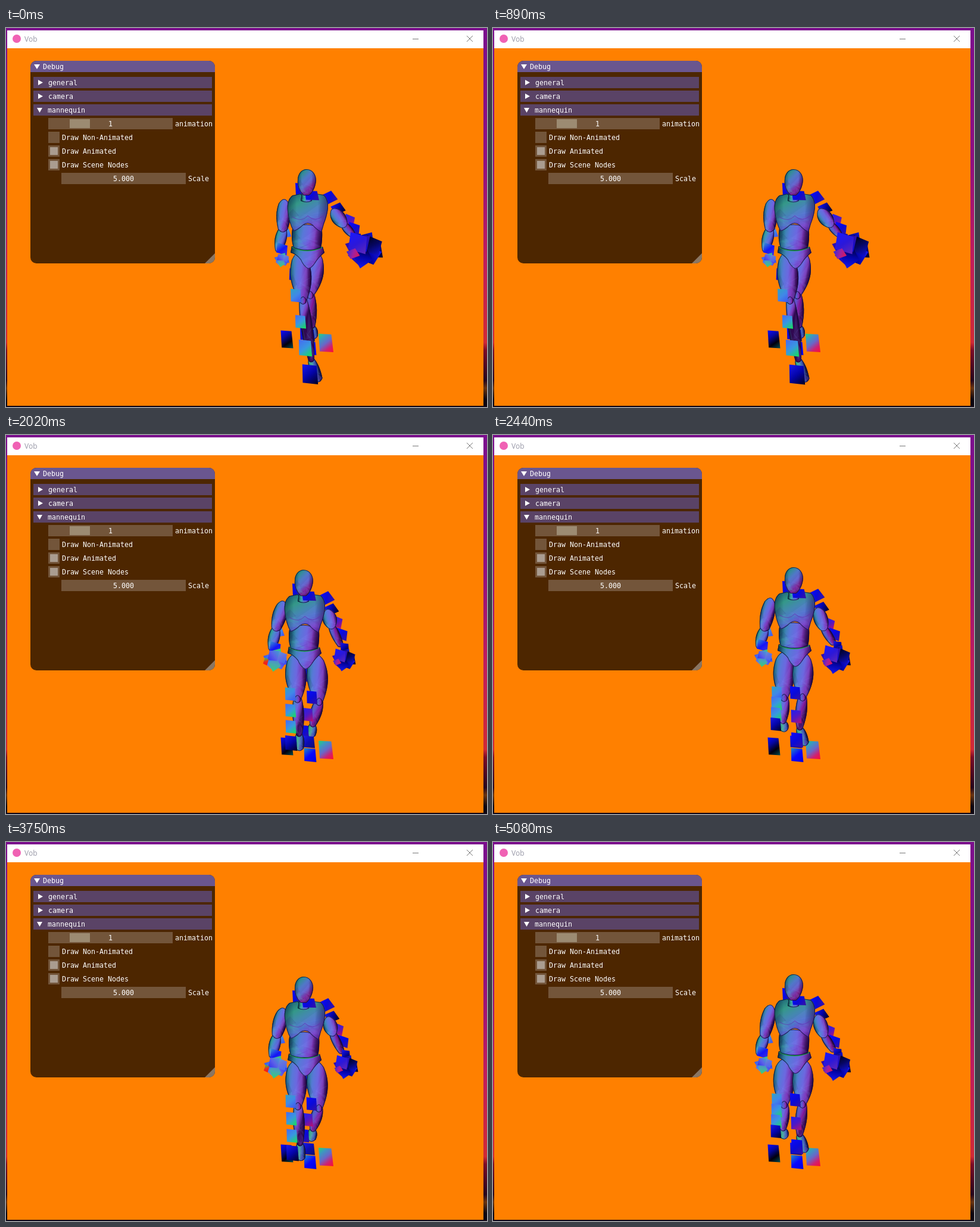
An HTML page with a canvas that plays this animation: 808 px wide and 636 px high, repeating every 5.18 s.

```html
<!DOCTYPE html>
<html lang="en">
<head>
<meta charset="utf-8">
<title>Vob</title>
<style>
html, body { margin: 0; width: 100%; height: 100%; overflow: hidden; background: #ff8000; }
svg, canvas { position: absolute; left: 0; top: 0; display: block; }
.ui { font: 11.63px "DejaVu Sans Mono", monospace; fill: #fff; white-space: pre; }
</style>
</head>
<body>
<svg width="808" height="636" viewBox="0 0 808 636">
  <defs>
    <linearGradient id="desk" x2="0" y2="1">
      <stop offset="0" stop-color="#7b0d8d"/><stop offset=".35" stop-color="#8f0f80"/>
      <stop offset=".6" stop-color="#c01c5c"/><stop offset=".83" stop-color="#d02a36"/>
      <stop offset=".85" stop-color="#7c0c26"/><stop offset=".93" stop-color="#26061c"/>
      <stop offset=".95" stop-color="#6a3410"/><stop offset=".98" stop-color="#0c0610"/>
    </linearGradient>
    <clipPath id="panel"><rect x="41" y="55" width="310" height="340" rx="10"/></clipPath>
  </defs>
  <g shape-rendering="crispEdges">
    <rect width="808" height="636" fill="url(#desk)"/>
    <rect y="634" width="808" height="2" fill="#120816"/>
    <rect x="2" y="4" width="800" height="30" fill="#fff"/>
    <rect x="2" y="34" width="800" height="600" fill="#ff8000"/>
    <path d="M683 18.5h10" stroke="#777"/>
  </g>
  <circle cx="18" cy="18" r="7" fill="#f062b4"/>
  <text x="31" y="23" font-size="12" fill="#9797a6" font-family="Open Sans, sans-serif">Vob</text>
  <path d="M774 13l10 10m0-10l-10 10" stroke="#777"/>

  <g clip-path="url(#panel)">
    <rect x="41" y="55" width="310" height="340" fill="#4d2600"/>
    <rect x="41" y="55" width="310" height="19" fill="#6a568f"/>
    <path d="M351 378v17h-17z" fill="#8a7663"/>
  </g>
  <path fill="#5a4366" d="M46 82h300v19h-300zM46 105h300v19h-300zM46 128h300v19h-300z"/>
  <path fill="#73553a" d="M71 151h209v19h-209zM71 174h19v19h-19zM71 197h19v19h-19zM71 220h19v19h-19zM93 243h209v19h-209z"/>
  <path fill="#9c8b72" d="M107 153h34v15h-34z"/>
  <path fill="#aa9c90" d="M74 200h13v13h-13zM74 223h13v13h-13z"/>
  <path fill="#fff" d="M47 61h10l-5 8zM54 87l8 4.5l-8 4.5zM54 110l8 4.5l-8 4.5zM52 134h9l-4.500 8z"/>
  <g class="ui">
    <text x="62" y="69">Debug</text>
    <text x="71" y="96">general</text>
    <text x="71" y="119">camera</text>
    <text x="70" y="142">mannequin</text>
    <text x="172" y="165">1</text>
    <text x="284" y="165">animation</text>
    <text x="94" y="188">Draw Non-Animated</text>
    <text x="94" y="211">Draw Animated</text>
    <text x="94" y="234">Draw Scene Nodes</text>
    <text x="180" y="257">5.000</text>
    <text x="306" y="257">Scale</text>
  </g>
</svg>
<canvas width="808" height="636"></canvas>
<script>
const g = document.querySelector('canvas').getContext('2d');
const LOOP = 5180, LAST = 5080, STRIDE = 879;

// Four poses of one stride: contact, passing, opposite contact, passing.
const KEYS = [0, .285, .5, .775];
// x at each key, then y at each key. L and R are sides of the picture.
const JOINTS = {
  head:  [505, 500, 503, 505, 237, 226, 238, 222],
  shL:   [467, 464, 463, 465, 295, 286, 295, 281],
  elL:   [465, 454, 449, 456, 338, 325, 330, 325],
  wrL:   [457, 446, 441, 446, 374, 360, 366, 356],
  handL: [464, 454, 453, 455, 389, 377, 387, 374],
  shR:   [553, 542, 540, 547, 311, 301, 302, 298],
  elR:   [568, 548, 543, 556, 331, 322, 326, 325],
  wrR:   [583, 563, 553, 572, 348, 353, 350, 350],
  handR: [603, 570, 556, 577, 372, 377, 369, 376],
  hipL:  [493, 485, 488, 488, 388, 379, 390, 376],
  knL:   [499, 490, 488, 489, 456, 442, 450, 440],
  anL:   [513, 493, 491, 487, 558, 505, 500, 482],
  toeL:  [525, 494, 490, 489, 590, 528, 514, 494],
  hipR:  [519, 521, 519, 521, 386, 379, 390, 376],
  knR:   [511, 526, 518, 520, 447, 446, 459, 439],
  anR:   [514, 515, 512, 515, 502, 485, 560, 493],
  toeR:  [517, 513, 508, 524, 518, 501, 594, 518]
};
const GRIP = { L: [13, 21, 21, 16], R: [33, 21, 19, 26] };

const SKIN = ['#0c3444', '#3488a8', '#5878d8', '#6c68e0', '#7c38b8', '#300850'];
const COOL = ['#0c5848', '#30a498', '#4c88d0', '#5c64d8', '#402898'];
const WARM = ['#203070', '#5068c8', '#6450cc', '#84189c', '#3c0850'];
const FOOT = ['#0c4c34', '#34b080', '#50a0a8', '#3c58b4', '#141c50'];
const BLUE = ['#0a0aff', '#0a0ad8', '#3810a0'];
const NAVY = ['#1818f0', '#0404a8', '#00001c'];
const PINK = ['#1c20f4', '#5018c4', '#c01068'];
const TEAL = ['#30a4c0', '#4088e8', '#4050f0'];
const LIME = ['#4868f4', '#3898e0', '#14e450'];

const HEAD = new Path2D('M0 0C11 0 16 10 16 19C15 30 10 40 4 44H-5C-12 38-16 28-15 18C-15 8-9 0 0 0Z');
const NECK = new Path2D('M-8 40H8L9 53Q0 58-10 53Z');
const CHEST = new Path2D('M-24 44L-10 41Q2 56 16 41L29 43Q37 50 36 66Q34 80 29 92L25 106Q14 100 10 94Q2 88-6 94Q-14 102-22 104Q-30 90-32 70Q-34 52-24 44Z');
const BELLY = new Path2D('M-24 100Q2 84 26 102Q27 118 24 132Q2 140-22 132Q-27 116-24 100Z');
const PELVIS = new Path2D('M-25 129Q2 140 27 130L30 140Q20 148 14 158Q8 167 2 167Q-6 162-10 152Q-18 142-27 140Z');

// Smooth periodic curve through the key values.
function track(v, p) {
  const at = i => KEYS[i & 3] + Math.floor(i / 4), val = i => v[i & 3];
  const slope = i => (val(i + 1) - val(i - 1)) / (at(i + 1) - at(i - 1));
  let i = 3;
  while (KEYS[i] > p) i--;
  const d = at(i + 1) - at(i), u = (p - at(i)) / d, w = 1 - u;
  return w * w * ((1 + 2 * u) * val(i) + u * d * slope(i)) +
         u * u * ((3 - 2 * u) * val(i + 1) - w * d * slope(i + 1));
}

function blend(x0, y0, x1, y1, cols) {
  const b = g.createLinearGradient(x0, y0, x1, y1);
  cols.forEach((c, i) => b.addColorStop(i / (cols.length - 1), c));
  return b;
}

function random(seed) {
  return () => (seed = (seed * 16807) % 2147483647) / 2147483647;
}

// Fills a shape, then adds flat facets, dark sides and an outline.
function part(path, fill, x, y, w, h) {
  g.save();
  g.fillStyle = fill;
  g.fill(path);
  g.clip(path);
  const rnd = random(7919);
  const tints = ['#50c8b0', '#201060', '#8038c8', '#8090f0'];
  g.globalAlpha = .12;
  for (let i = 0; i < 16; i++) {
    const cx = x + w * rnd(), cy = y + h * rnd();
    g.fillStyle = tints[i & 3];
    g.beginPath();
    for (let k = 0; k < 3; k++) g.lineTo(cx + (rnd() - .5) * w * .8, cy + (rnd() - .5) * h * .5);
    g.fill();
  }
  g.globalAlpha = .5;
  g.fillStyle = blend(x, 0, x + w, 0, ['#001830', '#00183000', '#18003000', '#18003000', '#180030']);
  g.fillRect(x, y, w, h);
  g.globalAlpha = .8;
  g.lineWidth = 2;
  g.strokeStyle = '#0a1038';
  g.stroke(path);
  g.restore();
}

// Tapered limb from a to b; half widths at the start, middle and end.
function limb(a, b, wa, wm, wb, cols) {
  const dx = b.x - a.x, dy = b.y - a.y, n = Math.hypot(dx, dy), w = Math.max(wa, wm, wb);
  const path = new Path2D();
  path.moveTo(-wa, 0);
  path.bezierCurveTo(-wm, n * .3, -wm, n * .6, -wb, n);
  path.quadraticCurveTo(0, n + wb * 1.2, wb, n);
  path.bezierCurveTo(wm, n * .6, wm, n * .3, wa, 0);
  path.quadraticCurveTo(0, -wa * 1.8, -wa, 0);
  g.save();
  g.translate(a.x, a.y);
  g.rotate(Math.atan2(dy, dx) - Math.PI / 2);
  part(path, blend(-w, 0, w, n * .1, cols), -w, -wa, 2 * w, n + 2 * wa);
  g.restore();
}

function cube(x, y, w, h, turn, cols) {
  g.save();
  g.translate(x, y);
  g.rotate(turn);
  g.fillStyle = blend(-w / 2, -h / 2, w / 2, h / 2, cols);
  g.beginPath();
  g.moveTo(-w * .5, -h * .5);
  g.lineTo(w * .36, -h * .46);
  g.lineTo(w * .5, h * .5);
  g.lineTo(-w * .42, h * .46);
  g.fill();
  g.restore();
}

function fist(c, r, sets) {
  for (let i = 0; i < 8; i++) {
    const a = i * 2.4;
    cube(c.x + Math.cos(a) * r * .46, c.y + Math.sin(a) * r * .38, r * .9, r * .8, i * .7, sets[i % sets.length]);
  }
}

function arms(j, p) {
  const { head: o, shL, elL, wrL, handL, shR, elR, wrR, handR } = j;
  cube(elL.x + 6, elL.y + 6, 14, 15, -.2, TEAL);
  limb(elL, wrL, 7, 11, 5, COOL);
  limb(shL, elL, 9, 13, 8, SKIN);
  cube(wrL.x + 7, wrL.y - 3, 20, 17, .25, ['#3890d0', '#1414f8', '#4030e0']);
  const rl = track(GRIP.L, p);
  fist(handL, rl, [TEAL, ['#4068f0', '#6470e0', '#5ca0d0'], ['#38d070', '#48a8b0', '#5078e0'], ['#3030f0', '#5c60e8', '#40a0d0']]);
  if (rl > 17) cube(handL.x - rl * .8, handL.y + 3, 8, 11, .4, ['#20d850', '#e83020', '#ff1010']);

  cube(o.x + 39, o.y + 47, 20, 19, -.5, BLUE);
  cube(shR.x + 5, shR.y - 8, 20, 17, -.45, NAVY);
  cube(elR.x + 9, elR.y - 8, 19, 17, .35, PINK);
  cube((elR.x + wrR.x) / 2 + 9, (elR.y + wrR.y) / 2 - 3, 22, 17, .3, BLUE);
  limb(elR, wrR, 6, 8, 5, WARM);
  limb(shR, elR, 10, 13, 7, SKIN);
  cube(wrR.x + 7, wrR.y + 3, 15, 13, .1, NAVY);
  const rr = track(GRIP.R, p);
  fist(handR, rr, [NAVY, BLUE, ['#1010d0', '#060660', '#000010']]);
  cube(handR.x - rr * .35, handR.y - rr * .33, rr, rr * .9, .25, ['#1818ff', '#2c18d8', '#6028b8']);
  cube(handR.x - rr * .6, handR.y + rr * .2, rr * .55, rr * .45, -.4, ['#3028d8', '#a020a0', '#e01850']);
}

function leg(hip, knee, ankle, toe, cols, nodes) {
  limb(ankle, toe, 6, 9, 7, FOOT);
  limb(knee, ankle, 7, 11, 5, cols);
  limb(hip, knee, 13, 20, 7, SKIN);
  limb({ x: knee.x, y: knee.y - 1 }, { x: knee.x, y: knee.y + 5 }, 5, 6, 5, WARM);
  nodes();
}

// Evenly spaced nodes from the knee to the foot, larger nearer the camera.
function chain(a, b, sets) {
  sets.forEach((cols, i) => {
    const u = i / (sets.length - 1), y = a.y + (b.y - a.y) * u;
    const s = 19 + Math.max(0, y - 490) * .1;
    cube(a.x + (b.x - a.x) * u, y, s, s * 1.15, .05, cols);
  });
}

function legs(j) {
  const { hipL, knL, anL, toeL, hipR, knR, anR, toeR } = j;
  const left = () => leg(hipL, knL, anL, toeL, SKIN, () =>
    chain({ x: knL.x - 12, y: knL.y - 7 }, { x: toeL.x - 14, y: toeL.y - 9 }, [TEAL, LIME, LIME, NAVY]));
  const right = () => leg(hipR, knR, anR, toeR, WARM, () =>
    chain({ x: knR.x - 12, y: knR.y - 6 }, { x: toeR.x - 13, y: toeR.y - 6 }, [BLUE, PINK, BLUE]));
  const order = toeL.y > toeR.y ? [right, left] : [left, right];
  order[0]();
  cube(509, 515, 21, 20, .05, ['#1818f0', '#0c0cb0', '#101068']);
  cube(511, 537, 22, 23, .05, ['#2090c0', '#0808ff', '#0000e0']);
  order[1]();
}

function torso(o) {
  g.save();
  g.translate(o.x, o.y);
  part(PELVIS, blend(-27, 130, 30, 150, SKIN), -27, 129, 57, 38);
  g.strokeStyle = '#149c3c';
  g.lineWidth = 2;
  g.stroke(new Path2D('M-24 131Q2 142 26 131'));
  part(BELLY, blend(-26, 100, 26, 110, SKIN), -26, 90, 52, 45);
  part(CHEST, blend(-20, 42, 18, 112, ['#206878', '#349888', '#4488b0', '#5070cc', '#7848c8', '#581c98']), -34, 42, 70, 62);
  g.lineWidth = 1;
  g.strokeStyle = '#6428b0b0';
  g.stroke(new Path2D('M-24 80Q-8 90 2 78Q14 90 28 78'));
  part(NECK, blend(-10, 0, 10, 0, COOL), -10, 40, 20, 16);
  cube(9, 44, 24, 16, 0, BLUE);
  part(HEAD, blend(-15, 4, 16, 34, ['#0c7460', '#348c98', '#5078c8', '#6060c8', '#802490', '#481050']), -16, 0, 32, 44);
  g.restore();
}

function draw(t) {
  const p = t / STRIDE % 1, j = {};
  for (const k in JOINTS) j[k] = { x: track(JOINTS[k].slice(0, 4), p), y: track(JOINTS[k].slice(4), p) };
  const o = j.head;
  g.clearRect(0, 0, 808, 636);
  cube(o.x - 11, o.y + 37, 16, 28, 0, BLUE);
  cube(o.x + 5, o.y + 177, 18, 22, .1, BLUE);
  cube(o.x - 22, o.y + 177, 15, 20, .1, BLUE);
  cube(472, 522.5, 21, 30, 0, ['#0a0aff', '#0606a0', '#00000c', '#004c50']);
  cube(537.5, 528.5, 25, 31, 0, ['#20d870', '#3c98c0', '#6868c8', '#d02070', '#ff0c30']);
  arms(j, p);
  legs(j);
  torso(o);
}

const start = performance.now();
function tick(now) {
  draw(Math.min(Math.max(0, now - start) % LOOP, LAST));
  requestAnimationFrame(tick);
}
tick(start);
</script>
</body>
</html>
```
